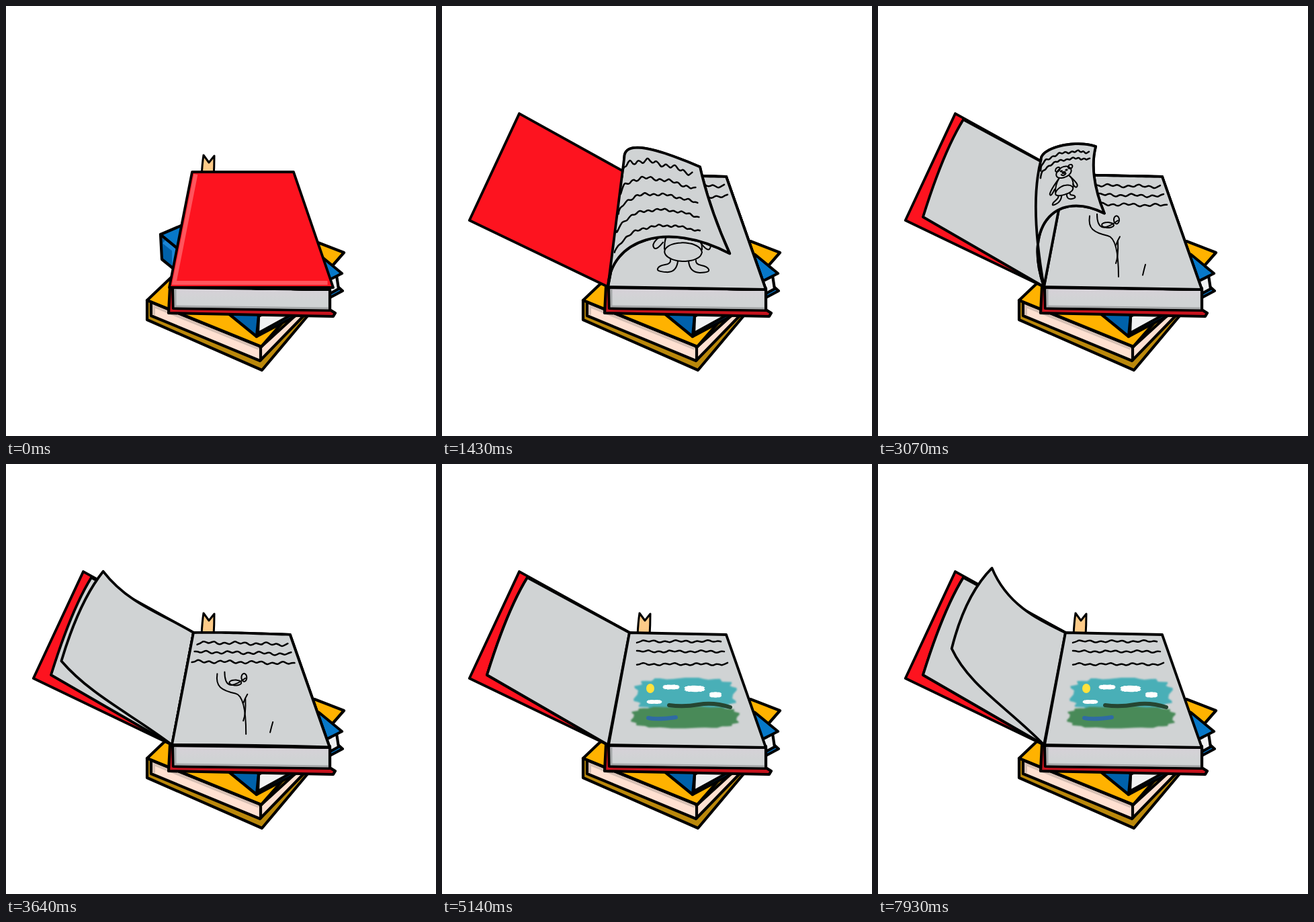
Animation, 640 px wide and 640 px high, one loop 8000 ms. Source, as an HTML page:

```html
<!DOCTYPE html>
<html lang="en">
<head>
<meta charset="utf-8">
<title>Picture book</title>
<style>
html, body { margin: 0; width: 100%; height: 100%; overflow: hidden; background: #fff; }
svg { display: block; width: 100vw; height: 100vh; }
.o { stroke: #000; stroke-width: 3.8; stroke-linejoin: round; stroke-linecap: round; }
#books .o { stroke-width: 4.2; }
.pen { fill: none; stroke: #000; stroke-linejoin: round; stroke-linecap: round; }
</style>
</head>
<body>
<svg viewBox="0 0 640 640">
  <defs>
    <filter id="soft"><feGaussianBlur stdDeviation="1.3"/></filter>
    <filter id="brush"><feGaussianBlur stdDeviation=".6"/></filter>
    <linearGradient id="edge" x2="0" y2="1"><stop stop-color="#d7d1d8"/><stop offset=".6" stop-color="#d0d3d4"/></linearGradient>
  </defs>
  <g id="books">
    <path class="o" fill="#ba880b" d="M210 438V467L381 542 450 460V400Z"/>
    <path class="o" fill="#ffe0d1" d="M216 441V461L378 528 446 458 437 455 379 508Z"/>
    <path fill="none" stroke="#d6bfb3" stroke-width="4" d="M220 460V447L376 510"/>
    <path class="o" fill="none" d="M379 508V527"/>
    <path class="o" fill="#ffb200" d="M210 438 380 507 503 367 459 350 250 400Z"/>
    <path class="o" fill="#0670bf" d="M373 492 501 424 492 416 376 470Z"/>
    <path class="o" fill="#f0f1f2" d="M376 462 492 401 495 421 375 487Z"/>
    <path class="o" fill="#0061aa" d="M230 340 232 377 373 492 376 461Z"/>
    <path fill="none" stroke="#1c86d6" stroke-width="6" d="M235 351 250 363V386"/>
    <path class="o" fill="#0778c8" d="M230 340 376 461 500 398 466 370 300 310Z"/>
    <path class="o" fill="#c5131d" d="M244 418 242 457 487 462 490 457 482 452V420Z"/>
    <path class="o" fill="url(#edge)" d="M248 419 482 422V453L249 450Z"/>
    <path fill="none" stroke="#a5a8a9" stroke-width="3" d="M252 422V447L480 450"/>
    <path class="o" style="stroke-width:3" fill="#fecb88" d="M291 255Q292 235 294 222L302 233 310 223Q310 240 309 255Z"/>
  </g>
  <g id="scene"></g>
</svg>
<script>
const FPS = 14, FRAMES = 112, TURN = 23.5, FLIP = .62, STARTS = [10.5, 30, 49];
const PAPER = '#d0d3d4', RED = '#fd131f';
const T = [279, 251], S = [247, 418];

// Flight of the free top and bottom corners, right to left
const TOP_PATH = [[423, 254], [335, 230], [205, 115], [127, 169]];
const BOTTOM_PATH = [[482, 422], [370, 285], [125, 205], [67, 314]];

const { sin, cos, PI, sign, abs } = Math;
const mix = (a, b, k) => a + (b - a) * k;
const mixPt = (p, q, k) => [mix(p[0], q[0], k), mix(p[1], q[1], k)];
const add = (p, x, y) => [p[0] + x, p[1] + y];
const xy = p => p[0].toFixed(1) + ' ' + p[1].toFixed(1) + ' ';
const points = (n, f) => Array.from({ length: n + 1 }, (_, i) => f(i / n, i));
const path = (d, fill) => `<path class="o" d="${d}" fill="${fill}"/>`;

function bez(b, t) {
  const s = 1 - t, w = [s * s * s, 3 * s * s * t, 3 * s * t * t, t * t * t];
  return [0, 1].map(i => w.reduce((sum, k, j) => sum + k * b[j][i], 0));
}

// Sheet shape at turn x (0 to 1): it curls on the way up and sags on the way down
function pose(x) {
  const e = x ** 1.6, k = e * e * (3 - 2 * e);
  const curl = sin(PI * x) ** 3, sag = 370 * k ** 4 * (1 - k), tilt = 1.2 - 3.3 * k;
  const P = bez(TOP_PATH, k), Q = bez(BOTTOM_PATH, k);
  return {
    k, curl,
    top: [T,
      add(mixPt(T, P, 1 / 3), -105 * curl * cos(tilt), -105 * curl * sin(tilt)),
      add(mixPt(T, P, 2 / 3), -30 * curl - .3 * sag, -34 * curl + sag), P],
    bottom: [S,
      add(mixPt(S, Q, 1 / 3), -65 * curl, -62 * curl),
      add(mixPt(S, Q, 2 / 3), -38 * curl - .5 * sag, -76 * curl + .6 * sag), Q],
    edge: add(mixPt(P, Q, .5), -20 * sin(PI * k), -24 * k)
  };
}

// Smooth pen line through points
function pen(pts, width) {
  let d = 'M' + xy(pts[0]);
  for (let i = 1; i < pts.length - 1; i++) d += 'Q' + xy(pts[i]) + xy(mixPt(pts[i], pts[i + 1], i < pts.length - 2 ? .5 : 1));
  return `<path class="pen" d="${d}" stroke-width="${width}"/>`;
}

const oval = (x, y, rx, ry) => points(24, k => [x + rx * cos(2 * PI * k), y + ry * sin(2 * PI * k)]);
const scribble = (x0, x1, y, amp, seed) => points(Math.round((x1 - x0) / 4.4), (k, i) =>
  [mix(x0, x1, k), y + amp * (sin(i * 1.75 + seed) + .55 * sin(i * .63 + seed * 2.3))]);
const lines = (ys, amp) => ys.map((y, i) => scribble(285 - 4 * i, 420 + 5 * i, y, amp, i * 3 + 1));

function bear() {
  const half = s => [
    oval(355 + 17 * s, 302, 6, 5.5),
    oval(355 + 7 * s, 309.5, 2, 1),
    [[357 + 15 * s, 327], [359 + 28 * s, 340], [359 + 28 * s, 362]],
    [[357 + 16 * s, 328], [357 + 32 * s, 342], [357 + 45 * s, 356], [357 + 38 * s, 365], [357 + 28 * s, 352]],
    [[359 + 19 * s, 378], [359 + 18 * s, 384], [359 + 36 * s, 387], [359 + 40 * s, 396], [359 + 10 * s, 397], [359 + 8 * s, 380]]
  ];
  return [...half(-1), ...half(1), oval(355, 314, 21, 15), oval(355, 315, 4, 2), oval(355, 315, 2, 1),
    [[348, 319], [355, 326], [361, 319]], oval(359, 366, 28, 14)];
}

const sprout = () => [
  [[315, 313], [313, 327], [326, 339], [358, 345], [358, 403]],
  [[326, 310], [326, 326], [340, 332], [357, 319]],
  oval(342, 326, 9, 4), oval(355, 318, 4, 6),
  [[360, 343], [356, 350], [354, 356]], [[357, 350], [358, 372], [354, 383]], [[398, 384], [396, 391], [394, 400]]
];

const ART = [
  [lines(points(4, (_, i) => 262 + 21 * i + 2.7 * i * i), 2.8), []],
  [lines([266, 282], 2.2), bear()],
  [lines([267, 281, 295], 2), sprout()]
];

// Draws flat art on the visible, curled face of a sheet
function artwork([text, sketch], p, tL) {
  const rise = 1 - .5 * p.curl * (1 - 2 * p.k), pull = 1 - .4 * p.curl;
  const place = ([x, y]) => {
    const v = Math.max(0, (y - 252) / 168), left = 279 - 32 * v, right = 423 + 59 * v;
    const u = Math.max(0, (x - left) / (right - left) - .13 * p.curl);
    const t = mix(tL, 1, u ** pull);
    return mixPt(bez(p.top, t), bez(p.bottom, t), v ** rise);
  };
  const group = (list, w) => list.map(pts => pen(pts.map(place), w)).join('');
  return group(text, 2.5) + group(sketch, 2);
}

function sheet(i, x) {
  const p = pose(x), [, a, b, P] = p.top, [, c, d, Q] = p.bottom;
  const tail = 'Q' + xy(p.edge) + xy(Q) + 'C' + xy(d) + xy(c) + xy(S) + 'Z';
  const back = path('M' + xy(T) + 'C' + xy(a) + xy(b) + xy(P) + tail, PAPER);
  if (x > FLIP) return back;

  // Front side, from the fold to the free edge
  let tL = 0;
  for (let t = 0; t < .8; t += .02) if (bez(p.top, t)[0] < bez(p.top, tL)[0]) tL = t;
  const L = bez(p.top, tL), gap = Math.max(0, 271 - L[0]);
  const bend = add(mixPt(S, L, .5), -.7 * gap, -gap);
  const fold = points(24, k => xy(bez(p.top, mix(tL, 1, k)))).join('L');
  return back + path('M' + xy(S) + 'Q' + xy(bend) + fold + tail, PAPER) + artwork(ART[i], p, tL);
}

function cover(k) {
  const c = cos(2.535 * k), s = sin(2.535 * k);
  const t = mixPt([277, 247], T, k), b = mixPt([243, 419], S, k);
  const P = add(t, 151 * c - 70 * s, -159.5 * s), Q = add(b, 244 * c - 10 * s, -173.7 * s);
  const at = (u, v) => xy(mixPt(mixPt(t, P, u), mixPt(b, Q, u), v));
  const shine = `<path d="M${at(.04, .02)}L${at(.025, .96)}L${at(.975, .96)}" fill="none" stroke="#ff555d" stroke-width="6"/>`;
  return path('M' + [t, P, Q, b].map(xy).join('L') + 'Z', RED) + (c > 0 ? shine : '');
}

// Painted patch: rounded box with a bumpy rim
function blob(x, y, rx, ry, fill, bump = .06) {
  const rim = points(60, k => {
    const c = cos(2 * PI * k), s = sin(2 * PI * k), r = 1 + bump * sin(14 * PI * k * 2 + x);
    return xy([x + rx * r * sign(c) * abs(c) ** .6, y + ry * r * sign(s) * abs(s) ** .6]);
  });
  return `<path d="M${rim.join('L')}Z" fill="${fill}"/>`;
}

const lastPage = path('M279 251L423 254 482 422 248 418Z', PAPER)
  + [264, 279, 298].map((y, i) => pen(scribble(290, 415 + 5 * i, y, 1.5, i * 3 + 1), 2.5)).join('')
  + `<g filter="url(#soft)">${blob(362, 343, 74, 24, '#4aafb7')}${blob(362, 377, 79, 16, '#488a58', .04)}</g>
  <g filter="url(#brush)"><g fill="none" stroke-linecap="round" stroke-width="6">
  <path stroke="#264632" d="M338 359Q360 362 382 358T429 362"/>
  <path stroke="#2f6ba3" d="M307 378Q320 381 348 377"/></g>
  <ellipse cx="310" cy="334" rx="6" ry="7" fill="#ffe23c"/>
  ${blob(341, 332, 12, 3.5, '#fff')}${blob(376, 334.5, 15, 4.5, '#fff')}${blob(407, 343.5, 9, 4, '#fff')}${blob(316, 354, 11, 3, '#fff')}</g>`;

const scene = document.getElementById('scene');
let shown = -1;

function draw(ms) {
  const frame = Math.floor(ms * FPS / 1000 + .1) % FRAMES;
  if (frame === shown) return;
  shown = frame;
  const turns = STARTS.map(s => Math.max(0, Math.min(1, (frame - s) / TURN)));
  if (frame >= 72) turns[2] = 1 - Math.max(0, frame - 107) / TURN;
  const open = Math.min(1, frame / 8), lid = cover(open);
  let left = '', right = '';
  turns.forEach((x, i) => {
    if (x > FLIP) left += sheet(i, x);
    else right = sheet(i, x) + right;
  });
  const pages = left + lastPage + right;
  scene.innerHTML = open > .6 ? lid + pages : pages + lid;
}

function tick(now) {
  draw(now % 8000);
  requestAnimationFrame(tick);
}
draw(0);
requestAnimationFrame(tick);
</script>
</body>
</html>
```
